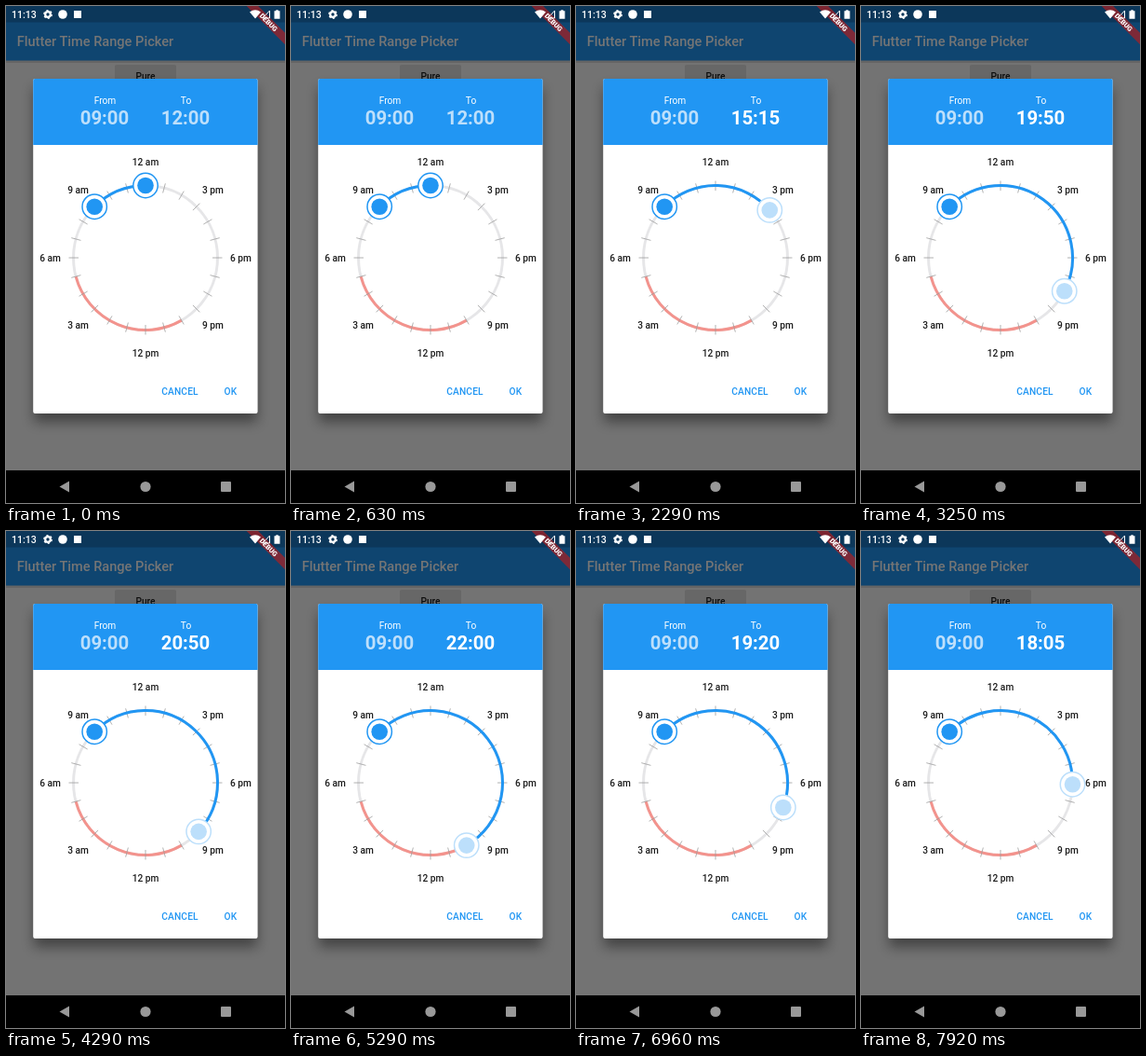
Recreate the animation shown at these times as an HTML page. Size 300 px wide and 533 px high, loop 8000 ms.

```html
<!DOCTYPE html>
<html lang="en">
<head>
<meta charset="utf-8">
<title>Time range picker</title>
<style>
  html, body { margin: 0; width: 100%; height: 100%; overflow: hidden; background: #000; }
  svg { display: block; width: 100%; height: 100%; }
  text { font: 500 10.2px Roboto, sans-serif; text-anchor: middle; }
  .start { text-anchor: start; }
  .time { font-size: 20.4px; font-weight: 700; }
  .action { fill: #2196f3; letter-spacing: .15px; }
  .track { fill: none; stroke-width: 3; }
</style>
</head>
<body>
<svg viewBox="0 0 300 533">
  <defs>
    <filter id="shadow" x="-20%" y="-20%" width="140%" height="140%">
      <feGaussianBlur stdDeviation="7"/>
    </filter>
  </defs>

  <!-- dimmed page -->
  <rect width="300" height="498" fill="#737373"/>
  <rect y="58" width="300" height="3" fill="#000" opacity=".12"/>
  <rect width="300" height="58.5" fill="#0f4570"/>
  <rect width="300" height="17.5" fill="#0c375a"/>
  <text class="start" x="11.7" y="43" fill="#757575" style="font-size:14.6px">Flutter Time Range Picker</text>
  <rect x="117" y="64" width="66" height="26" rx="2" fill="#000" opacity=".2"/>
  <rect x="117" y="63" width="66" height="26" rx="2" fill="#676767"/>
  <text x="150" y="79" fill="#0d0d0d">Pure</text>

  <!-- dialog -->
  <rect x="30" y="88" width="240" height="358" opacity=".42" filter="url(#shadow)"/>
  <rect x="29.2" y="78" width="241.4" height="359" rx="2" fill="#fff"/>
  <path d="M29.2 149V80q0-2 2-2H268.6q2 0 2 2V149z" fill="#2196f3"/>
  <g fill="#fff">
    <text x="106.5" y="105" style="font-weight:400">From</text>
    <text x="193.5" y="105" style="font-weight:400">To</text>
    <text class="time" x="106" y="126.5" opacity=".7">09:00</text>
    <text class="time" x="193" y="126.5" id="toTime">12:00</text>
  </g>
  <text class="action" x="187" y="417.2">CANCEL</text>
  <text class="action" x="241.5" y="417.2">OK</text>

  <!-- dial -->
  <g transform="translate(150 270)">
    <circle class="track" r="77.5" stroke="#e6e6e8"/>
    <path class="track" id="blocked" stroke="#f3938d"/>
    <path id="ticks" stroke="#9e9e9e" stroke-width=".8"/>
    <path class="track" id="range" stroke="#2196f3"/>
    <g id="labels" fill="#1c1c1c"></g>
    <g id="fromKnob"></g>
    <g id="toKnob"></g>
  </g>

  <!-- debug ribbon -->
  <g transform="translate(300 0) rotate(45)">
    <rect x="-42" y="20.4" width="84" height="8.8" fill="#b71c1c" opacity=".66"/>
    <text y="27.5" fill="#fff" style="font-size:7.4px;font-weight:900">DEBUG</text>
  </g>

  <!-- status bar -->
  <g fill="#fff">
    <text class="start" x="6" y="12.7" style="font-size:10.6px">11:13</text>
    <circle cx="45" cy="9" r="2.8" fill="none" stroke="#fff" stroke-width="2.2"/>
    <circle cx="45" cy="9" r="4.2" fill="none" stroke="#fff" stroke-width="1.4" stroke-dasharray="2.2"/>
    <circle cx="61" cy="9" r="4.8"/>
    <rect x="73" y="5" width="8" height="8"/>
    <path d="M268 13.5L262 6.4Q268 2.2 274 6.4z"/>
    <path d="M276 13L283.5 5V13z" fill="none" stroke="#fff"/>
    <path d="M288.5 5.3H290.3V4.2H292.7V5.3H294.5V13.7H288.5z"/>
  </g>

  <!-- navigation bar -->
  <rect y="498" width="300" height="35"/>
  <g fill="#999">
    <path d="M57.5 515.5L68 509.5V521.5z"/>
    <circle cx="150" cy="515.5" r="5.6"/>
    <rect x="231" y="510" width="11" height="11" rx="1"/>
  </g>
</svg>
<script>
const RADIUS = 77.5, LOOP = 8000, FROM = 9 * 60, BLUE = '#2196f3', PALE = '#bcdffb';
const $ = id => document.getElementById(id);

// Place on the dial for minutes of the day; noon is at the top.
function place(minutes, r = RADIUS) {
  const a = (minutes / 720 - 1) * Math.PI;
  return [r * Math.sin(a), -r * Math.cos(a)];
}

function arc(start, end) {
  const large = end - start > 720 ? 1 : 0;
  return `M${place(start)}A${RADIUS} ${RADIUS} 0 ${large} 1 ${place(end)}`;
}

function drawKnob(id, minutes, color) {
  $(id).setAttribute('transform', `translate(${place(minutes)})`);
  $(id).innerHTML = `<circle r="13.2" fill="#fff" stroke="${color}" stroke-width="1.5"/>
    <circle r="8.8" fill="${color}"/>`;
}

let ticks = '';
for (let h = 0; h < 24; h++) ticks += `M${place(h * 60, 72)}L${place(h * 60, 82.5)}`;
$('ticks').setAttribute('d', ticks);
$('blocked').setAttribute('d', arc(22 * 60, 29 * 60));
['12 am', '3 pm', '6 pm', '9 pm', '12 pm', '3 am', '6 am', '9 am'].forEach((label, i) => {
  const [x, y] = place(720 + i * 180, 102.5);
  $('labels').innerHTML += `<text x="${x}" y="${y + 3.6}">${label}</text>`;
});
drawKnob('fromKnob', FROM, BLUE);

// Drag of the end knob: [ms, minutes of the day]
const drag = [[1600, 720], [3250, 1190], [3380, 1190], [5290, 1320], [5500, 1320],
  [6960, 1160], [7580, 1095], [7830, 1095], [7920, 1085], [LOOP, 1085]];

function endAt(t) {
  if (t <= drag[0][0]) return drag[0][1];
  const i = drag.findIndex(([ms]) => ms >= t);
  const [t0, m0] = drag[i - 1], [t1, m1] = drag[i];
  return Math.round((m0 + (m1 - m0) * (t - t0) / (t1 - t0)) / 5) * 5;
}

const two = n => String(n).padStart(2, '0');

function render(now) {
  const t = now % LOOP, end = endAt(t), held = t >= drag[0][0];
  $('range').setAttribute('d', arc(FROM, end));
  drawKnob('toKnob', end, held ? PALE : BLUE);
  $('toTime').textContent = two(Math.floor(end / 60)) + ':' + two(end % 60);
  $('toTime').setAttribute('opacity', held ? 1 : .7);
  requestAnimationFrame(render);
}
render(0);
</script>
</body>
</html>
```
